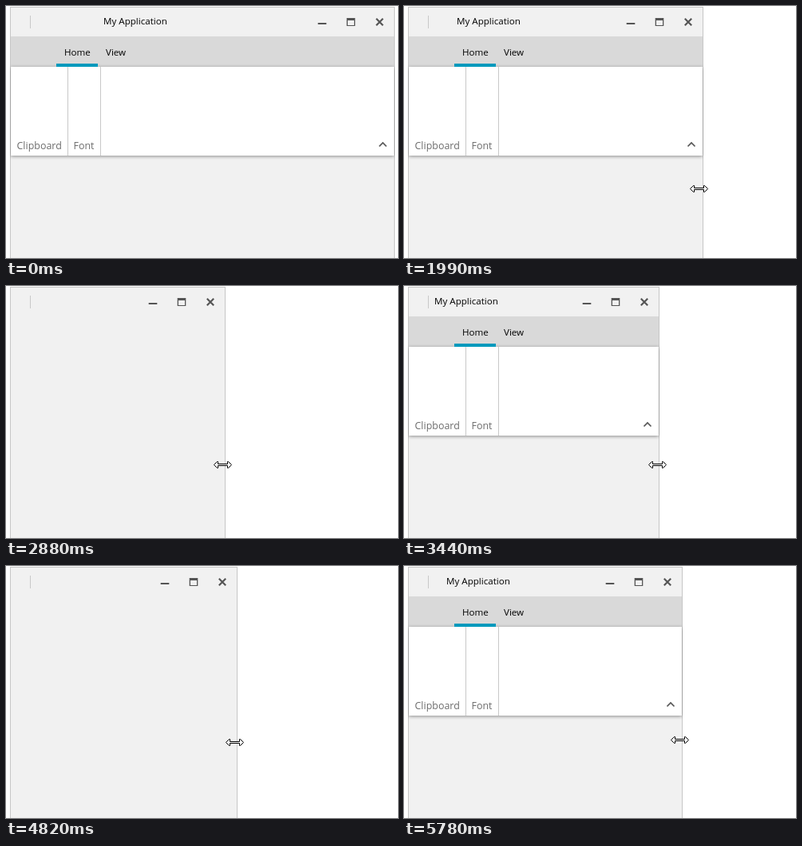
Recreate the animation shown at these times as an HTML page. Size 491 by 315 pixels, loop 6040 ms.

```html
<!DOCTYPE html>
<html lang="en">
<head>
<meta charset="utf-8">
<title>Window resize</title>
<style>
  html, body { margin: 0; width: 100%; height: 100%; overflow: hidden; background: #fff; }
  svg { display: block; width: 491px; height: 315px; }
  text { font-family: "Open Sans", "Noto Sans", sans-serif; font-size: 11.6px; fill: #000; }
  .label { font-size: 12.45px; fill: #6c6c6c; }
  .panel { fill: #fff; filter: drop-shadow(0 1px 2.2px rgba(0, 0, 0, .42)); }
  .rule { fill: #c8c8c8; }
  .icon { fill: none; stroke: #555; stroke-width: 2.2; }
  .thin { stroke-width: 1.7; }
  .glyph { fill: #555; }
  .cursor { fill: #fff; stroke: #000; stroke-linejoin: round; }
</style>
</head>
<body>
<svg viewBox="0 0 491 315">
  <defs>
    <clipPath id="clip"><rect id="clipBox" x="5" y="1" height="314"/></clipPath>
  </defs>

  <rect id="frame" x="5.5" y="1.5" height="330" fill="#f1f1f1" stroke="#c6c6c6"/>
  <rect class="rule" x="30" y="12" width="1" height="16"/>

  <g id="ribbon" clip-path="url(#clip)">
    <rect id="tabs" x="6" y="38" height="38" fill="#d9d9d9"/>
    <rect id="panel" class="panel" x="6" y="76" height="111"/>
    <rect x="63" y="72" width="52" height="4" fill="#0099bc"/>
    <text x="73" y="62">Home</text>
    <text x="125" y="62">View</text>
    <rect class="rule" x="77" y="76" width="1" height="111"/>
    <rect class="rule" x="118" y="76" width="1" height="111"/>
    <text class="label" x="13.5" y="179">Clipboard</text>
    <text class="label" x="84.5" y="179">Font</text>
    <path id="chevron" class="icon thin" d="M-19.5 175.5l4.5-4.5 4.5 4.5"/>
    <text id="title" y="23">My Application</text>
  </g>

  <g id="buttons">
    <rect class="glyph" x="-96.3" y="21" width="10.6" height="2"/>
    <path class="glyph" fill-rule="evenodd" d="M-60.3 15h10.6v10h-10.6zM-59 18v6h8v-6z"/>
    <path class="icon" d="M-23.2 15.8l8.4 8.4m0-8.4l-8.4 8.4"/>
  </g>

  <path id="arrow" class="cursor" d="M.5.5v16l3.7-3.5 2.6 6 2.2-1-2.6-5.8h5.2z"/>
  <path id="sizer" class="cursor" d="M-11 0l4-4h1v3h12v-3h1l4 4-4 4h-1v-3h-12v3h-1z"/>
</svg>
<script>
const LOOP = 6040, STEP = 70;
const FULL = 487;        // right edge of the unresized window
const MIN_RIGHT = 305;   // the ribbon hides when the window is narrower
const GRIP = 4;          // pointer rests this far inside the edge

// Key points of each drag: time, window right edge, pointer height
const drags = [
  [[1220, 478, 246], [1990, 375, 228], [2410, 287, 224], [2550, 271, 223]],
  [[2880, 275, 223], [3720, 343, 224]],
  [[4120, 339, 224], [4820, 290, 220]],
  [[5220, 295, 220], [5780, 349, 217]]
];

const el = {};
for (const node of document.querySelectorAll("svg [id]")) el[node.id] = node;

const lerp = (a, b, k) => a + (b - a) * k;
const show = (node, on) => node.setAttribute("visibility", on ? "visible" : "hidden");
const move = (node, x, y = 0) => node.setAttribute("transform", `translate(${x} ${y})`);
const half = v => Math.floor(v) + .5;

// Time advances in whole steps and rests at the end of a movement
const stepped = (t, start, end) =>
  Math.min(end, start + Math.floor((t - start) / STEP) * STEP);

function approach(t) {
  const k = (stepped(t, 200, 760) - 200) / 560;
  return { right: FULL, x: lerp(437, FULL - GRIP, k), y: lerp(304, 247, k) };
}

function pose(t) {
  if (t < 200) return { right: FULL };
  const keys = drags.filter(d => d[0][0] <= t).pop();
  if (!keys) return approach(t);

  const first = keys[0], last = keys[keys.length - 1];
  const q = stepped(t, first[0], last[0]);
  const i = Math.max(1, keys.findIndex(key => key[0] >= q));
  const a = keys[i - 1], b = keys[i];
  const k = (q - a[0]) / (b[0] - a[0]);
  const right = Math.round(lerp(a[1], b[1], k));

  // The window trails slightly behind the pointer in mid-drag
  const done = (q - first[0]) / (last[0] - first[0]);
  const lead = 2 * Math.sin(Math.PI * done) * Math.sign(last[1] - first[1]);
  return { right, x: right - GRIP + lead, y: lerp(a[2], b[2], k) };
}

function draw(t) {
  const { right, x, y } = pose(t);

  el.frame.setAttribute("width", right - 6);
  el.clipBox.setAttribute("width", right - 5);
  el.tabs.setAttribute("width", right - 7);
  el.panel.setAttribute("width", right - 7);
  el.title.setAttribute("x", Math.floor(right / 2 - 121.5));
  show(el.ribbon, right >= MIN_RIGHT);
  move(el.buttons, right);
  move(el.chevron, right);

  const visible = x !== undefined;
  const sizing = visible && right - x < 7;
  show(el.arrow, visible && !sizing);
  show(el.sizer, sizing);
  if (sizing) move(el.sizer, half(x), half(y));
  else if (visible) move(el.arrow, Math.round(x), Math.round(y));
}

const begin = performance.now();
function tick() {
  draw((performance.now() - begin) % LOOP);
  requestAnimationFrame(tick);
}
tick();
</script>
</body>
</html>
```
